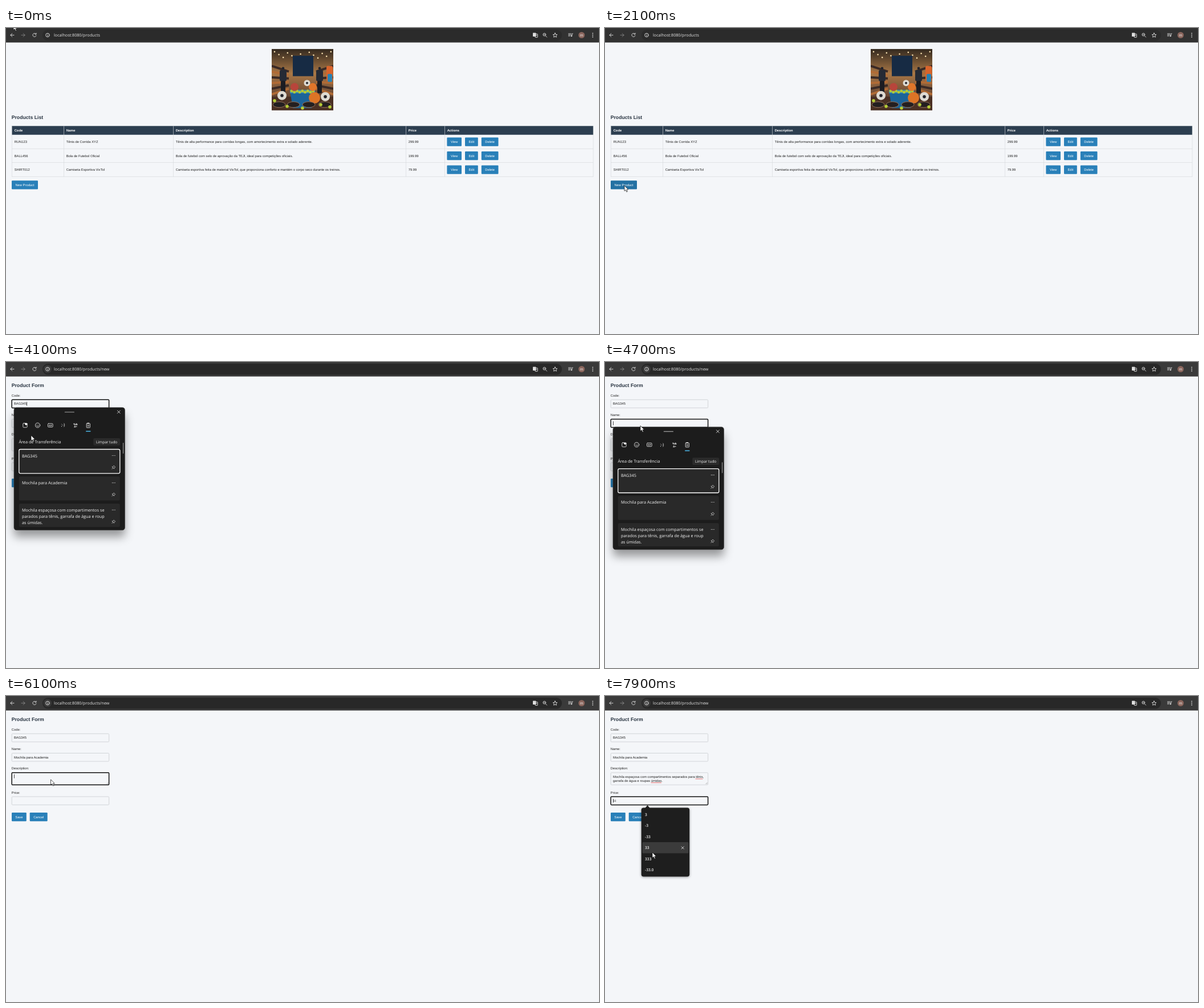
Animation of 1040 by 538 pixels, one loop 8 s. Source, as an HTML page:

```html
<!DOCTYPE html>
<html lang="pt">
<head>
<meta charset="utf-8">
<title>Products</title>
<style>
  html, body { margin: 0; width: 100%; height: 100%; overflow: hidden; background: #f4f6f9; }
  svg { display: block; width: 100vw; height: 100vh; }
  text { text-rendering: geometricPrecision; white-space: pre; }
  .page { font: 5.8px "Liberation Sans", Arial, sans-serif; }
  .page .b { font-weight: bold; }
  .page .title { font-size: 8.7px; font-weight: bold; }
  .ui { font: 7.3px "Open Sans", "Noto Sans", sans-serif; }
  .mid { text-anchor: middle; }
  .line { fill: none; stroke: #e0e0e0; stroke-width: .9; stroke-linecap: round; stroke-linejoin: round; }
  .panel { filter: drop-shadow(0 12px 8px rgba(0, 0, 0, .38)); }
</style>
</head>
<body>
<svg id="stage" viewBox="0 0 1040 538"></svg>
<script>
const LOOP = 8000, STEP = 100;
const INK = '#222', BLUE = '#2980b9', NAVY = '#2c3e50';
const stage = document.getElementById('stage');

const rect = (x, y, w, h, fill, r = 0, more = '') =>
  `<rect x="${x}" y="${y}" width="${w}" height="${h}" rx="${r}" fill="${fill}" ${more}/>`;
const circle = (x, y, r, fill, more = '') => `<circle cx="${x}" cy="${y}" r="${r}" fill="${fill}" ${more}/>`;
const path = (d, more = 'class="line"') => `<path d="${d}" ${more}/>`;
const text = (x, y, s, fill = INK, more = '') => `<text x="${x}" y="${y}" fill="${fill}" ${more}>${s}</text>`;
const group = (x, y, body, more = '') => `<g transform="translate(${x} ${y})" ${more}>${body}</g>`;
const cross = (x, y, r) => path(`M${x - r} ${y - r}l${2 * r} ${2 * r}m0 ${-2 * r}l${-2 * r} ${2 * r}`);
const button = (x, y, w, label, fill = BLUE) =>
  rect(x, y, w, 15.3, fill, 1.2) + text(x + w / 2, y + 9.8, label, '#fff', 'class="mid"');

// Pointer track: time, x, y
const track = [
  [0, 13, -6], [200, 13, -6], [500, 200, 180], [800, 395, 322], [1000, 385, 226],
  [1400, 379, 214], [1500, 372, 216], [2000, 34, 277], [2400, 34, 277], [2700, 75, 74],
  [3100, 87, 109], [3200, 87, 112], [3600, 55, 166], [3900, 50, 165], [4100, 44, 129],
  [4400, 60, 107], [4700, 62, 112], [5300, 70, 247], [5700, 70, 247], [6000, 78, 145],
  [6300, 80, 152], [6800, 84, 353], [7000, 84, 350], [7200, 84, 340], [7500, 80, 185], [7900, 83, 275]
];

function pointerAt(t) {
  const i = track.findIndex(k => k[0] > t);
  if (i < 0) return track[track.length - 1].slice(1);
  const [t0, x0, y0] = track[i - 1], [t1, x1, y1] = track[i];
  const p = (t - t0) / (t1 - t0), e = p * p * (3 - 2 * p);
  return [x0 + (x1 - x0) * e, y0 + (y1 - y0) * e];
}

const pointer = (x, y) => group(x, y, path('M0 0V9.6L2.2 7.6L3.8 11.2L5.4 10.5L3.9 7H6.8Z',
  'fill="#fff" stroke="#111" stroke-width=".7"'));

function toolbar(url, form) {
  const back = path('M14 12.5H8m2.8-3L8 12.5l2.8 3');
  return rect(0, 0, 1040, 25.5, form ? '#3a3a3a' : '#323232') +
    rect(64, 3, 911, 19.5, form ? '#282828' : '#2b2b2b', 9.7) +
    back + group(60, 0, '') +
    `<g transform="matrix(-1 0 0 1 41 0)" opacity=".45">${back}</g>` +
    path('M52.5 10.5a3.1 3.1 0 1 0 .5 2.8M53 9v2h-2.2') +
    (form ? circle(73, 12.5, 7, '#3a3a3a') : '') +
    circle(73, 12.5, 3.3, 'none', 'class="line"') + path('M73 12.3v1.9M73 10.8v.1') +
    text(84, 15.2, url, '#e4e4e4', 'style="font-size:7.2px"') +
    rect(924, 8.5, 5.5, 6.5, '#ddd', .6) + rect(928, 10.5, 4.3, 6, 'none', .5, 'class="line"') +
    path('M925.5 11h2.4m1.5 2h1.8') +
    circle(944.3, 11.6, 2.4, 'none', 'class="line"') + path('M946.2 13.6l2.4 2.5m-5.2-4.5h1.8') +
    path('M963 8.8l1.1 2.5 2.7.3-2 1.9.6 2.7-2.4-1.4-2.4 1.4.6-2.7-2-1.9 2.7-.3z') +
    path('M986.5 10h4.5m-4.5 2h4.5m-4.5 2h2.6M992.6 14v-4h1.6') + circle(991.7, 14.1, 1.2, '#ddd') +
    circle(1009.5, 12.5, 5.5, '#8a655c') + text(1009.5, 14.7, 'm', '#fff', 'class="mid" style="font-size:6.5px"') +
    [9.3, 12.5, 15.7].map(y => circle(1029, y, .9, '#ddd')).join('');
}

// Shop picture in flat shapes, 108 units square
function picture() {
  let s = rect(0, 0, 108, 108, 'url(#shop)');
  for (let i = 0; i < 6; i++) {
    s += path(`M0 ${30 + i * 10}L30 ${40 + i * 6}M108 ${30 + i * 10}L78 ${40 + i * 6}`,
      `stroke="${i % 2 ? '#b06b36' : '#3b2a25'}" stroke-width="4"`);
  }
  for (let i = 0; i < 14; i++) s += circle(5 + i * 7.6, 5 + i * 5 % 13, 1.3, '#ffe7b5');
  for (const x of [20, 84]) {
    s += circle(x, 34, 2.3, '#20222a') + rect(x - 6, 37, 12, 20, '#252a35', 3) + rect(x - 4, 56, 8, 22, '#1b1c22', 2);
  }
  s += rect(96, 30, 11, 27, '#d9642c', 2) + rect(98, 44, 8, 14, '#2682b4', 2);
  s += rect(0, 84, 108, 24, '#4a3024') + path('M32 73H76L70 104H37Z', 'fill="#1c6499"') + rect(32, 72, 44, 6, '#338bc0');
  for (let i = 0; i < 9; i++) s += circle(35 + i * 4.7, 74 + i % 2 * 2, 2.5, '#b4c934');
  s += circle(40, 67, 7, '#b8453b') + circle(72, 67, 7, '#e0752a') + circle(75, 86, 10, '#dc7426');
  for (const [x, y, r] of [[18, 82, 8], [94, 84, 8], [62, 60, 5.5]]) s += circle(x, y, r, '#dedbd3') + circle(x, y, r * .35, '#23242b');
  for (const x of [13, 38, 65, 93]) s += `<ellipse cx="${x}" cy="98" rx="11" ry="5" fill="#241f20" stroke="#94725a"/>`;
  for (const [x, y] of [[5, 91], [27, 101], [54, 104], [86, 98], [102, 102]]) s += circle(x, y, 2.8, '#b6cc36');
  return group(466, 36.7, s + rect(37, 12, 36, 36, '#172b44'), 'clip-path="url(#photo)"');
}

const columns = [10, 101, 293, 701, 769];
const products = [
  ['RUN123', 'Tênis de Corrida XYZ', 'Tênis de alta performance para corridas longas, com amortecimento extra e solado aderente.', '299.99'],
  ['BALL456', 'Bola de Futebol Oficial', 'Bola de futebol com selo de aprovação da TEJI, ideal para competições oficiais.', '199.99'],
  ['SHIRT012', 'Camiseta Esportiva VixTol', 'Camiseta esportiva feita de material VixTol, que proporciona conforto e mantém o corpo seco durante os treinos.', '79.99']
];

function listPage(px, py) {
  const over = px > 10 && px < 1030 ? Math.floor((py - 187.7) / 24.5) : -1;
  const onNew = px > 10 && px < 56 && py > 268 && py < 284;
  let s = picture() + text(9.7, 160.3, 'Products List', '#26323f', 'class="title"') + rect(10, 172.3, 1020, 15.4, NAVY);
  ['Code', 'Name', 'Description', 'Price', 'Actions'].forEach((h, i) => {
    s += text(columns[i] + 4.7, 182.2, h, '#fff', 'class="b"');
  });
  products.forEach((row, i) => {
    const y = 187.7 + i * 24.5;
    if (i === over) s += rect(10, y, 1020, 24.5, '#dbe0e3');
    row.forEach((cell, c) => { s += text(columns[c] + 4.7, y + 14.5, cell); });
    s += button(773.4, y + 4.7, 25.6, 'View') + button(805, y + 4.7, 22.8, 'Edit') + button(833.8, y + 4.7, 29.7, 'Delete');
    s += rect(10, y + 24.2, 1020, .6, '#d4d7da');
  });
  for (const x of [...columns, 1029.7]) s += rect(x, 172.3, .6, 89.2, '#d4d7da');
  return s + button(10, 268.2, 46, 'New Product', onNew ? '#2471a3' : BLUE);
}

const fieldTops = [66.3, 100.5, 134.8, 177], fieldHeights = [14.4, 14.4, 21.4, 14.4];
const bag = 'Mochila para Academia';

function formPage(t) {
  const focus = t < 2700 ? -1 : t < 4400 ? 0 : t < 6000 ? 1 : t < 7400 ? 2 : 3;
  const edited = [2700, 3900, 4500, 5500, 6100, 7000, 7500].filter(k => k <= t).pop();
  const caret = edited && (t - edited) % 1000 < 500;
  let s = text(9.7, 44, 'Product Form', '#26323f', 'class="title"');
  ['Code:', 'Name:', 'Description:', 'Price:'].forEach((label, i) => {
    const y = fieldTops[i], on = i === focus;
    s += text(9.8, y - 5.5, label) + rect(10.2, y, 170.4, fieldHeights[i], '#f4f6f9', 1.3,
      `stroke="${on ? '#111' : '#c5c8cc'}" stroke-width="${on ? 1.5 : .7}"`);
  });
  s += path('M176.5 155l3-3m-1.2 3l1.2-1.2', 'stroke="#777" stroke-width=".5"');
  if (t >= 3900) s += text(14, 75.4, 'BAG345');
  if (t >= 5500) s += text(14, 109.8, bag);
  if (t >= 7000) {
    s += text(14, 144.3, 'Mochila espaçosa com compartimentos separados para tênis,') + text(14, 151, 'garrafa de água e roupas úmidas.');
    s += path('M158.5 145.8H171.5M80.5 152.5H99', 'stroke="#e03a3a" stroke-width=".7"');
  }
  if (caret) {
    const x = [t < 3900 ? 14 : 36.3, t < 5500 ? 14 : 74.7, t < 7000 ? 14 : 99.5, 14][focus];
    const y = fieldTops[focus] + (focus === 2 ? (t < 7000 ? 3 : 10.5) : 3.8);
    s += rect(x, y, .7, 6.8, '#000');
  }
  return s + button(10, 205, 25.8, 'Save') + button(41.7, 205, 31, 'Cancel');
}

// Autofill list below a field, with a small preview inside the field
function autofill(top, items, px, py) {
  const hover = px > 64 && px < 148 ? Math.floor((py - top - 4) / 19.5) : -1;
  let s = path(`M70 ${top + 1}L74.5 ${top - 4.5}L79 ${top + 1}Z`, 'fill="#1e1e1e"') +
    rect(63.7, top, 84.5, items.length * 19.5 + 4, '#1e1e1e', 4, 'style="filter:drop-shadow(0 1px 2px #0006)"');
  items.forEach((item, i) => {
    const y = top + 2 + i * 19.5;
    if (i === hover) s += rect(65.5, y, 81, 19.5, '#3b3b3b', 1.5) + cross(136.2, y + 9.8, 2.1);
    s += text(70, y + 12.3, item, '#f2f2f2', 'style="font-size:6.7px;font-weight:600"');
  });
  const preview = items[hover];
  return s + (preview ? text(14, top - 10.9, preview, '#333', 'style="font:4.9px Liberation Sans,sans-serif"') : '');
}

const clips = [['BAG345'], [bag], ['Mochila espaçosa com compartimentos se', 'parados para tênis, garrafa de água e roup', 'as úmidas.']];

function clipboard(dy, selected) {
  let s = rect(14, 80, 194.5, 215.6, '#1c1c1c', 4.5, 'class="panel"') +
    rect(14, 80, 194.5, 215.6, 'none', 4.5, 'stroke="#3a3a3a" stroke-width=".6"') +
    rect(102.7, 87.4, 17.3, 1.3, '#8b8b8b', .6) + cross(197.8, 87.8, 2.4);
  s += rect(29.8, 107.6, 7.4, 7.4, 'none', 1.4, 'class="line"') + path('M35.2 111.4l-2.3-2.2q0-2 2.3-1.1q2.3-.9 2.3 1.1z', 'fill="#fff"') +
    circle(55.6, 111.2, 4.1, 'none', 'class="line"') + path('M53.6 112.3q2 2 4 0M54.2 110v.1M57 110v.1') +
    rect(73.5, 108.2, 8.6, 6.2, 'none', 1.2, 'class="line"') + text(77.8, 112.7, 'GIF', '#fff', 'class="mid" style="font-size:3.6px;font-weight:700"') +
    text(100, 113.4, ';-)', '#fff', 'class="mid" style="font-size:7.5px"') +
    text(122, 110.8, '%&amp;', '#fff', 'class="mid" style="font-size:4.5px;font-weight:700"') +
    text(122, 115.4, 'Δ+', '#fff', 'class="mid" style="font-size:4.5px;font-weight:700"') +
    rect(141.2, 108, 6.2, 7.5, 'none', .8, 'class="line"') + rect(142.8, 106.8, 3, 1.8, '#e0e0e0', .5) +
    path('M143 111h2.7m-2.7 2h2.7') + rect(140, 121, 8.6, 1.5, '#4cb8ea', .7);
  s += text(22.4, 143.2, 'Área de Transferência', '#f4f4f4') + rect(153.3, 134, 46.8, 12.8, '#2b2b2b', 2) +
    text(176.7, 142.8, 'Limpar tudo', '#f4f4f4', 'class="mid" style="font-size:6.5px"') + rect(205, 142, 1.1, 19, '#9a9a9a', .5);
  clips.forEach((lines, i) => {
    const y = 153.5 + i * 47.8;
    s += rect(22.8, y, 177, i === 2 ? 41 : 42.3, '#292929', 2.5,
      i === selected ? 'stroke="#fff" stroke-width="1.3"' : '');
    lines.forEach((l, n) => { s += text(28, y + 14 - (i === 2 ? .6 : 0) + n * 11.3, l, '#f4f4f4'); });
    for (const x of [186.5, 188.8, 191.1]) s += circle(x, y + 11, .6, '#eee');
    s += path(`M185.8 ${y + 34.6}l2-2m-1.6-1.6l3.2 3.2l.5-1.6l1.8-1.3l-2.6-2.6l-1.3 1.8z`, 'class="line" style="stroke-width:.7"');
  });
  return group(0, dy, s, 'class="ui"');
}

const defs = `<defs><clipPath id="photo"><path d="M0 0H108V108H0Z"/></clipPath>
  <linearGradient id="shop" x2="0" y2="1"><stop stop-color="#33291f"/><stop offset=".4" stop-color="#a87746"/>
  <stop offset=".75" stop-color="#6c4a35"/><stop offset="1" stop-color="#33251f"/></linearGradient></defs>`;

function scene(t) {
  const [px, py] = pointerAt(t), form = t >= 2400;
  let s = defs + group(0, 0, toolbar('localhost:8080/products' + (form ? '/new' : ''), form), 'class="ui"') +
    group(0, 0, form ? formPage(t) : listPage(px, py), 'class="page"');
  let popup = '';
  if (t >= 2800 && t < 3200) popup = autofill(86, ['BAG345', 'SHIRT012'], px, py);
  else if (t >= 3200 && t < 4300) popup = clipboard(0, 0);
  else if (t >= 4700 && t < 5900) popup = clipboard(34.2, t < 5400 ? 0 : 1);
  else if (t >= 6300 && t < 7200) popup = clipboard(68.4, t < 7000 ? 0 : 2);
  else if (t >= 7500) popup = autofill(196.6, ['3', '-3', '-33', '33', '333', '-33.0'], px, py);
  return s + group(0, 0, popup, 'class="ui"') + pointer(px, py);
}

let shown = -1;
function tick() {
  const t = Math.floor(performance.now() % LOOP / STEP) * STEP;
  if (t !== shown) stage.innerHTML = scene(shown = t);
  requestAnimationFrame(tick);
}
tick();
</script>
</body>
</html>
```
